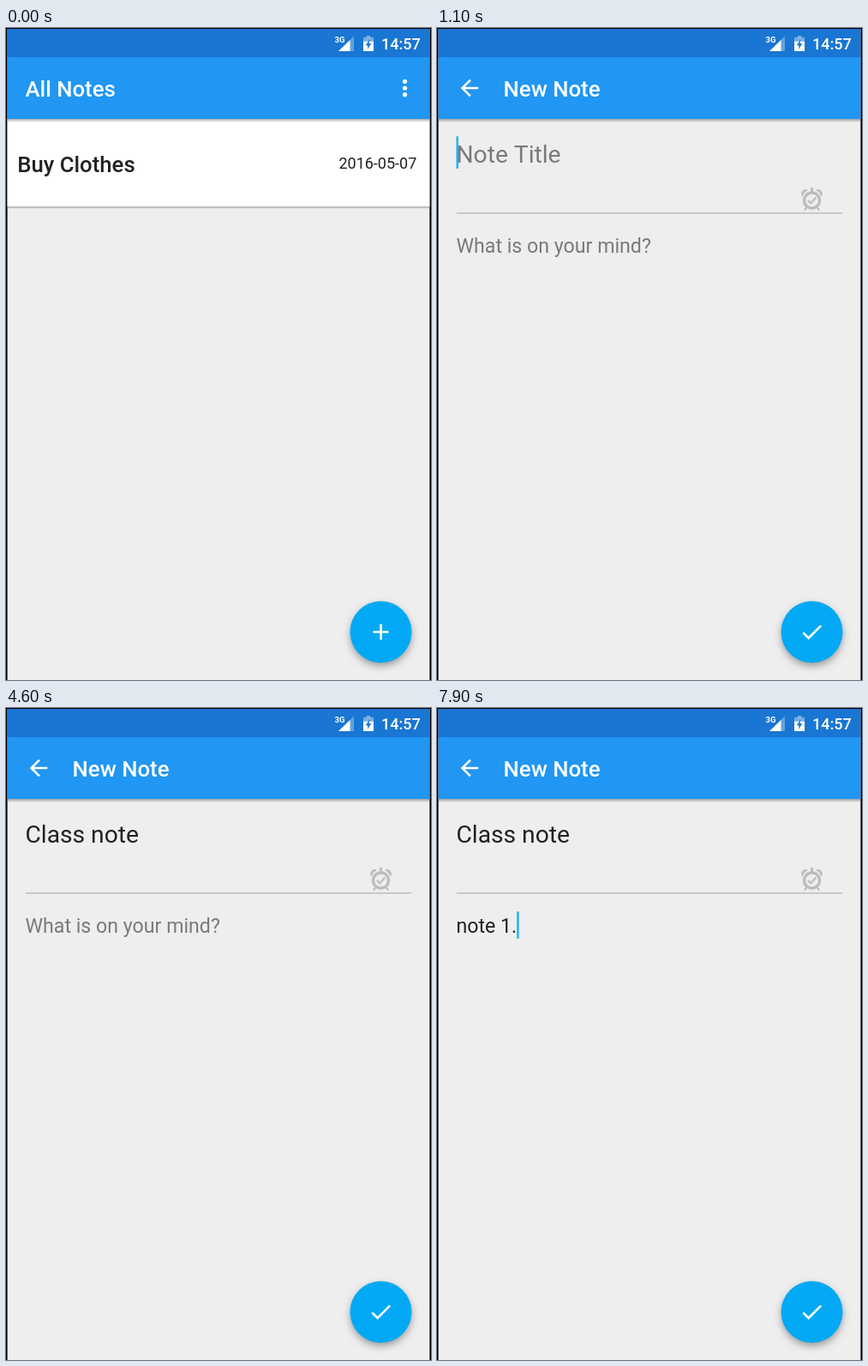
Recreate the animation shown at these times as an HTML page with a canvas. Size 496 by 760 pixels, loop 8000 ms.

```html
<!DOCTYPE html>
<html lang="en">
<head>
<meta charset="utf-8">
<title>Notes</title>
<style>
  html, body { margin: 0; width: 100%; height: 100%; overflow: hidden; background: #000; }
  canvas { display: block; width: 496px; height: 760px; }
</style>
</head>
<body>
<canvas id="stage" width="496" height="760"></canvas>
<script>
const W = 496, H = 760, LOOP = 8000, STEP = 100, DP = 1.2865;
const ctx = document.getElementById('stage').getContext('2d');

const COLOR = {
  page: '#eeeeee', status: '#1976d2', bar: '#2196f3', accent: '#03a9f4',
  ink: '#212121', hint: '#7a7a7a', icon: '#bdbdbd'
};
const ARROW = new Path2D('M20 11H7.83l5.59-5.59L12 4l-8 8 8 8 1.41-1.41L7.83 13H20z');
const DONE = new Path2D('M9 16.17L4.83 12l-1.42 1.41L9 19 21 7l-1.41-1.41z');
const PLUS = new Path2D('M19 13h-6v6h-2v-6H5v-2h6V5h2v6h6z');

// Each entry: start in ms, title, body, field holding a visible caret.
const EDITS = [
  [1000, '', '', 'title'], [1400, '', '', ''], [1900, '', '', 'title'], [2300, '', '', ''],
  [2600, 'C', '', 'title'], [2800, 'Cl', '', 'title'], [3000, 'Cla', '', 'title'],
  [3100, 'Clas', '', 'title'], [3300, 'Class', '', 'title'], [3500, 'Class ', '', 'title'],
  [3700, 'Class n', '', 'title'], [3800, 'Class no', '', 'title'],
  [4100, 'Class note', '', 'title'], [4600, 'Class note', '', ''],
  [5100, 'Class note', '', 'title'], [5200, 'Class note', '', 'body'],
  [5700, 'Class note', '', ''], [6100, 'Class note', 'n', 'body'],
  [6300, 'Class note', 'no', 'body'], [6500, 'Class note', 'not', 'body'],
  [6600, 'Class note', 'note', 'body'], [6900, 'Class note', 'note ', 'body'],
  [7300, 'Class note', 'note 1', 'body'], [7700, 'Class note', 'note 1', ''],
  [7900, 'Class note', 'note 1.', 'body']
];

function rect(x, y, w, h, color) {
  ctx.fillStyle = color;
  ctx.fillRect(x, y, w, h);
}

function text(str, x, y, size, color, weight = 400) {
  ctx.font = `${weight} ${size}px Roboto, sans-serif`;
  ctx.fillStyle = color;
  ctx.fillText(str, x, y);
  return ctx.measureText(str).width;
}

function disc(x, y, r, color) {
  ctx.fillStyle = color;
  ctx.beginPath();
  ctx.arc(x, y, r, 0, Math.PI * 2);
  ctx.fill();
}

function polygon(points, color) {
  ctx.fillStyle = color;
  ctx.beginPath();
  points.forEach(([x, y]) => ctx.lineTo(x, y));
  ctx.fill();
}

function icon(path, cx, cy, color = '#fff') {
  ctx.save();
  ctx.translate(cx, cy);
  ctx.scale(DP, DP);
  ctx.translate(-12, -12);
  ctx.fillStyle = color;
  ctx.fill(path);
  ctx.restore();
}

function shadowBelow(y, height, alpha) {
  const fade = ctx.createLinearGradient(0, y, 0, y + height);
  fade.addColorStop(0, `rgba(0,0,0,${alpha})`);
  fade.addColorStop(1, 'rgba(0,0,0,0)');
  rect(0, y, W, height, fade);
}

function chrome(title, x) {
  rect(0, 0, W, 34, COLOR.status);
  rect(0, 34, W, 72, COLOR.bar);
  shadowBelow(106, 4, 0.32);
  text(title, x, 80, 25.73, '#fff', 500);
}

function fab(path, press = 0) {
  const x = 437.5, y = 704, r = 36;
  ctx.save();
  ctx.shadowColor = 'rgba(0,0,0,.34)';
  ctx.shadowBlur = 8 + press * 6;
  ctx.shadowOffsetY = 4 + press * 4;
  disc(x, y, r, COLOR.accent);
  ctx.restore();
  if (press) disc(x, y, r, `rgba(0,0,0,${0.1 * press})`);
  icon(path, x, y);
}

function alarm() {
  const x = 437.5, y = 201;
  ctx.save();
  ctx.strokeStyle = COLOR.icon;
  ctx.lineWidth = 3.4;
  ctx.beginPath();
  ctx.arc(x, y, 9, 0, Math.PI * 2);
  ctx.stroke();
  ctx.lineWidth = 2.2;
  ctx.beginPath();
  ctx.moveTo(x - 4.5, y);
  ctx.lineTo(x - 1.3, y + 3.4);
  ctx.lineTo(x + 4.8, y - 3.4);
  for (const side of [-1, 1]) {
    ctx.moveTo(x + side * 6, y + 8);
    ctx.lineTo(x + side * 8.6, y + 11.6);
  }
  ctx.stroke();
  rect(x - 1.5, y - 15, 3, 5, COLOR.icon);
  for (const side of [-1, 1]) {
    polygon([
      [x + side * 4.6, y - 12], [x + side * 7, y - 13.2], [x + side * 10, y - 12.2],
      [x + side * 12.3, y - 9], [x + side * 12.3, y - 6.2], [x + side * 11, y - 4.8],
      [x + side * 8.5, y - 9.2]
    ], COLOR.icon);
  }
  ctx.restore();
}

function statusIcons() {
  text('3G', 383.5, 17, 9.5, '#fff', 700);
  polygon([[388, 27], [406, 27], [406, 9.5]], 'rgba(255,255,255,.32)');
  polygon([[388, 27], [401.5, 27], [401.5, 14]], '#fff');
  rect(420.5, 9, 5, 2.2, 'rgba(255,255,255,.4)');
  rect(417, 11, 12, 4.5, 'rgba(255,255,255,.4)');
  rect(417, 15.5, 12, 11.5, '#fff');
  polygon([[424.2, 13], [419.8, 20.4], [422.5, 20.4], [421.9, 25], [426.4, 18], [423.6, 18]], COLOR.status);
  text('14:57', 438, 25, 18, '#fff', 500);
}

function listScreen(press) {
  rect(0, 0, W, H, COLOR.page);
  rect(0, 106, W, 102, '#fff');
  shadowBelow(208, 3, 0.3);
  chrome('All Notes', 22.5);
  for (const dy of [-7.7, 0, 7.7]) disc(465.5, 70 + dy, 2.6, '#fff');
  text('Buy Clothes', 13.3, 167.5, 25.73, COLOR.ink, 500);
  text('2016-05-07', 388.4, 164.3, 18, COLOR.ink);
  fab(PLUS, press);
}

function field(value, hint, baseline, size, caretTop, caretHeight, hasCaret) {
  const x = 22.5;
  const width = text(value || hint, x, baseline, size, value ? COLOR.ink : COLOR.hint);
  if (hasCaret) rect(x + (value ? width : 0), caretTop, 2.4, caretHeight, '#14b1f5');
}

function noteScreen([, title, body, caret]) {
  rect(0, 0, W, H, COLOR.page);
  chrome('New Note', 77.6);
  icon(ARROW, 38, 70);
  field(title, 'Note Title', 156.5, 28.2, 126.3, 37.5, caret === 'title');
  rect(23, 215, 450, 1.5, '#bdbdbd');
  alarm();
  field(body, 'What is on your mind?', 262, 23.16, 237.3, 31.5, caret === 'body');
  fab(DONE);
}

// The note window rises by 8% of the screen while it fades in.
function enterState(elapsed) {
  const ease = (duration, power) => 1 - (1 - Math.min(1, elapsed / duration)) ** power;
  return { lift: 61 * (1 - ease(350, 5)), alpha: ease(200, 4) };
}

function draw(t) {
  ctx.fillStyle = '#000';
  ctx.fillRect(0, 0, W, H);
  ctx.save();
  ctx.beginPath();
  ctx.rect(1.6, 1, 492.8, H);
  ctx.clip();

  if (t < 1000) {
    const press = t < 600 ? 0 : t < 700 ? 0.5 : t < 800 ? 1 : 0.4;
    listScreen(press);
  } else {
    const edit = EDITS.findLast(([start]) => start <= t);
    if (t < 1100) {
      const { lift, alpha } = enterState(t - 883);
      listScreen(0);
      rect(0, 0, W, H, 'rgba(0,0,0,.12)');
      ctx.save();
      ctx.translate(0, lift);
      noteScreen(edit);
      ctx.restore();
      ctx.save();
      ctx.beginPath();
      ctx.rect(0, lift, W, H);
      ctx.clip();
      ctx.globalAlpha = 1 - alpha;
      listScreen(0);
      ctx.restore();
    } else {
      noteScreen(edit);
    }
  }
  statusIcons();
  ctx.restore();
}

const begin = performance.now();
function tick() {
  const t = (performance.now() - begin) % LOOP;
  draw(Math.floor(t / STEP) * STEP);
  requestAnimationFrame(tick);
}
tick();
</script>
</body>
</html>
```
